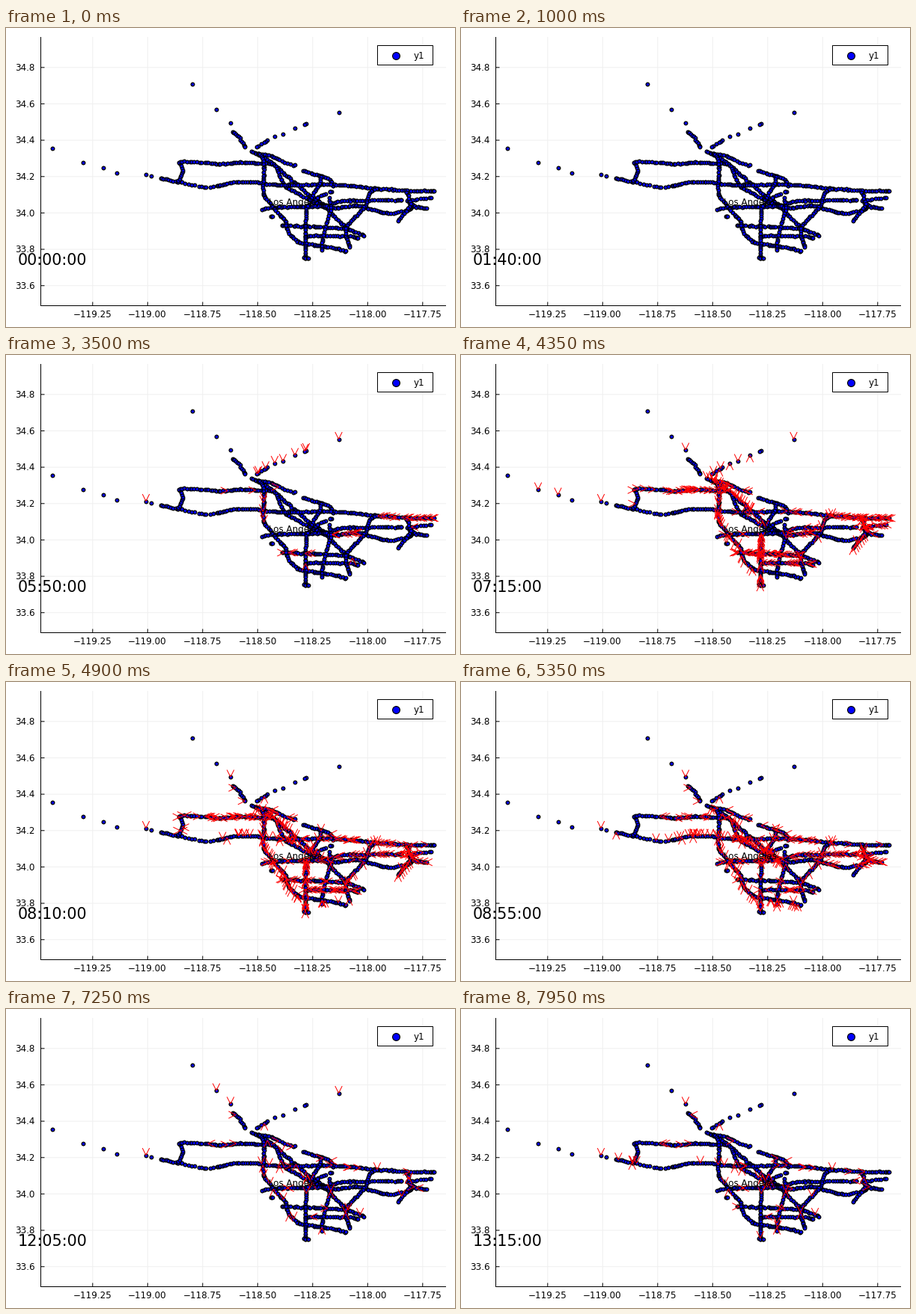
Write a matplotlib script that moves like this. It is 600 by 400 pixels and loops after 8 s.

```python
import numpy as np
import matplotlib.pyplot as plt
from matplotlib.animation import FuncAnimation
from matplotlib.patches import Rectangle

W, H, DPI = 600, 400, 100
FRAMES, INTERVAL = 160, 50
PT = 72 / DPI                   # points per pixel
HUB = np.array([375, 237])      # where the morning traffic heads
RISE, FALL = 45, 50             # minutes either side of a peak
START = 275                     # first slow traffic, minutes after midnight

rng = np.random.default_rng(7)
lanes = []


def walk(pts, gap):
    """Irregularly spaced stations along a polyline with softened corners."""
    dist = np.r_[0, np.cumsum(np.hypot(*np.diff(pts, axis=0).T))]
    steps = gap * rng.uniform(0.45, 1.55, int(2 * dist[-1] / gap) + 8)
    s = np.cumsum(steps) - steps[0]
    s = np.r_[s[s < dist[-1]], dist[-1]]
    soft = np.add.outer([-4, 0, 4], s)
    xy = [np.interp(soft, dist, pts[:, k]).mean(axis=0) for k in (0, 1)]
    return np.column_stack(xy) + rng.normal(0, 0.3, (len(s), 2))


def patches(n):
    """Smooth random strength along a road."""
    knots = rng.uniform(-0.1, 1.5, n // 8 + 2)
    return np.clip(np.interp(np.arange(n) / 8, np.arange(len(knots)), knots), 0, 1)


def road(axis, load, peak, *pts, gap=2.7):
    """Stations and both traffic directions; load is the share slow at the peak minute."""
    pts = np.array(pts, float)
    if gap:
        pts = walk(pts, gap)
    k = "xy".index(axis)
    back = np.zeros_like(pts)
    back[:, k] = np.sign(pts[:, k] - HUB[k])
    for side, share, late in ((1, 1, 0), (-1, 0.3, 50)):
        n = len(pts)
        lanes.append(np.column_stack([
            pts, side * back, np.full(n, load * share), np.full(n, peak + late),
            patches(n), rng.uniform(0.02, 1, n), rng.uniform(0, 2 * np.pi, n)]))


# Outlying stations
road("y", 0.5, 435, (62, 161), (103, 180), (129.5, 187), (147.5, 193.5), (187, 195.5),
     (194, 197.5), gap=0)
road("y", 0.5, 700, (249, 75), (281, 109), (300, 127), gap=0)
road("y", 1, 365, (444.5, 112.5), (401, 127.5), (399, 128.7), (386, 134), (370, 142),
     (359, 144.5), gap=0)
road("y", 0.9, 385, (350, 149.5), (335, 160), gap=3.5)
road("x", 0.25, 545, (302, 138), (311, 145), (320, 160), gap=2.2)
road("x", 0, 500, (353, 251), (357, 252))

# Western and northern valleys
road("y", 0.2, 780, (206, 201), (236, 207))
road("y", 0.4, 545, (238, 208), (270, 214), (284, 211), gap=4.2)
road("y", 0.5, 545, (284, 211), (304, 206), (335, 206), (346, 208.5), (367, 210))
road("x", 0.9, 450, (230, 205), (237, 190), (230, 178), (262, 179.5), (290, 182),
     (310, 179.5), (358, 181.5))
road("y", 0.9, 440, (327, 164), (350, 176), (388, 208), gap=2.5)
road("y", 0.4, 520, (388, 208), (399, 219), (425, 237))
road("y", 0.15, 400, (425, 237), (442, 256), (460, 271), (480, 278))
road("x", 0.6, 460, (336, 168), (352, 170), (370, 179), (387, 184), gap=3.2)
road("x", 0.5, 560, (396, 190), (420, 198), (434, 202), (437, 212))
road("y", 0.9, 525, (362, 187), (368, 205), (374, 213), (402, 228), (427, 240))

# East-west freeways
road("x", 0.55, 490, (367, 210), (390, 209.5), (440, 209), (495, 215))
road("x", 0.95, 400, (495, 215), (545, 218), (573, 218))
road("x", 0.6, 505, (341, 243), (355, 240), (425, 238))
road("x", 0.85, 515, (425, 238), (448, 231), (530, 230))
road("x", 1, 420, (535, 231), (548, 229), (570, 227), gap=4)
road("x", 0.8, 375, (425, 238), (440, 241), (470, 237))
road("x", 0.5, 560, (470, 237), (500, 246), (515, 249), (540, 243), (544, 236))
road("x", 1, 530, (537, 233), (550, 240), (563, 241), gap=3.2)
road("x", 1, 420, (367, 264), (400, 265), (453, 268))
road("x", 0.9, 465, (399, 278), (460, 278), (471, 281))

# North-south freeways
road("y", 1, 415, (336, 167), (343, 173), (345, 187), (343, 215), (345, 225))
road("y", 0.7, 480, (345, 225), (362, 246), (374, 258), (375, 272), (391, 287),
     gap=2.5)
road("y", 0.4, 560, (391, 287), (415, 291), (440, 294), (455, 299))
road("y", 0.9, 445, (402, 237), (400, 265), (400, 308))
road("x", 0, 445, (397, 308), (405, 308))
road("y", 0.4, 530, (421, 198), (420, 207), (405, 231))
road("y", 0.2, 530, (436, 218), (419, 225), (402, 239), gap=3.8)
road("y", 0.4, 560, (431, 226), (435, 240), (423, 280), (422, 299), gap=3.6)
road("y", 0.5, 480, (497, 214), (485, 220), (480, 238), (455, 265), (453, 276),
     (460, 294))
road("y", 0.7, 455, (535, 218), (541, 236), (523, 259), gap=3.4)

table = np.vstack(lanes)
tips, backs = table[:, :2], table[:, 2:4]
load, peak, patch, limit, phase = table[:, 4:].T

# Stage, one data unit per pixel
plt.rcParams["font.family"] = "DejaVu Sans"
fig = plt.figure(figsize=(W / DPI, H / DPI), dpi=DPI, facecolor="white")
ax = fig.add_axes([0, 0, 1, 1])
ax.set_xlim(0, W)
ax.set_ylim(H, 0)
ax.axis("off")


def line(xs, ys, color="black", z=1):
    ax.plot(xs, ys, color=color, lw=PT, zorder=z, solid_capstyle="butt", snap=False)


def label(x, y, s, ha="center", px=11.9, z=6):
    return ax.text(x, y, s, ha=ha, va="baseline", fontsize=px * PT, zorder=z)


def dots(x, y, size, edge, z):
    ax.plot(x, y, "o", ms=size * PT, mew=edge * PT, mfc="blue", mec="black",
            zorder=z, snap=False)


LEFT, RIGHT, TOP, BOTTOM = 46.5, 588, 12, 371.5
for i in range(7):
    x, y = 115.8 + 73.5 * i, 52.8 + 48.65 * i
    line([x, x], [TOP, BOTTOM], "#f0f0f0", 0)
    line([LEFT, RIGHT], [y, y], "#f0f0f0", 0)
    line([x, x], [BOTTOM, BOTTOM - 5])
    line([LEFT, LEFT + 5], [y, y])
    label(x - 0.3, 387.3, f"{-119.25 + 0.25 * i:.2f}".replace("-", "\u2212"))
    label(38.5, y + 4.4, f"{34.8 - 0.2 * i:.1f}", "right")
line([LEFT, LEFT], [TOP, BOTTOM + 0.5])
line([LEFT, RIGHT], [BOTTOM, BOTTOM])

dots(tips[:, 0], tips[:, 1], 4.5, 1.1, 3)
arrows, = ax.plot([], [], color="red", lw=PT, zorder=4, solid_joinstyle="miter")
label(386.5, 237.3, "Los Angeles")
clock = label(61.8, 317, "00:00:00", px=20.8)

ax.add_patch(Rectangle((496.5, 23.5), 74, 26, fc="white", ec="black", lw=PT,
                       zorder=7, snap=False))
dots([520.7], [36.6], 9.8, 1.2, 8)
label(544.7, 41.3, "y1", "left", z=8)


def heads(tip, back):
    """Open arrow heads, separated by gaps."""
    side = 4.5 * back[:, ::-1]
    gap = np.full_like(tip, np.nan)
    corners = [tip + 9 * back - side, tip, tip + 9 * back + side, gap]
    return np.stack(corners, axis=1).reshape(-1, 2)


def slow(minute):
    """Which lanes are slow: a rush-hour bump over a light daytime base."""
    if minute < START:
        return np.zeros(len(limit), bool)
    width = np.where(minute < peak, RISE, FALL)
    rush = load * np.exp(-((minute - peak) / width) ** 2 / 2) * (0.35 + 0.65 * patch)
    base = 0.11 * patch ** 2 * np.clip((minute - 380) / 200, 0, 1) * (load > 0)
    drift = 0.05 * np.sin(minute / 9 + phase)
    return np.clip(limit + drift, 0.02, 1) < np.maximum(rush, base)


def update(frame):
    minute = 5 * frame
    on = slow(minute)
    path = heads(tips[on], backs[on])
    arrows.set_data(path[:, 0], path[:, 1])
    clock.set_text(f"{minute // 60:02d}:{minute % 60:02d}:00")
    return arrows, clock


anim = FuncAnimation(fig, update, frames=FRAMES, interval=INTERVAL, repeat=True,
                     repeat_delay=0, blit=False)
plt.show()
```
